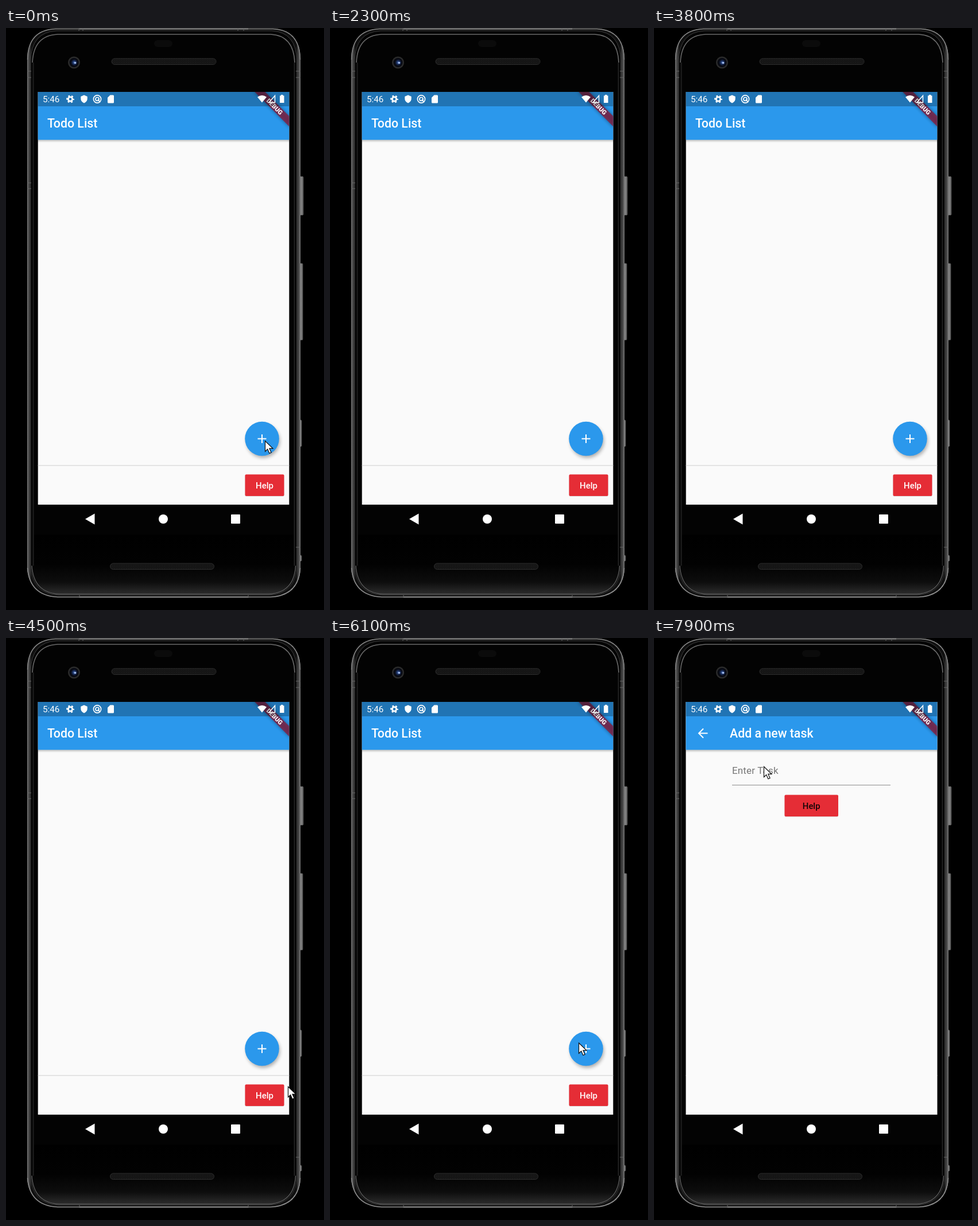
These frames come from a looping animation (554 px wide and 1011 px high, 8000 ms). An HTML page:

```html
<!DOCTYPE html>
<html lang="en">
<head>
<meta charset="utf-8">
<title>Todo List</title>
<style>
  html, body { margin: 0; width: 100%; height: 100%; overflow: hidden; background: #000; }
  svg { display: block; width: 100%; height: 100%; }
  text { font-family: Roboto, sans-serif; }
  .title { font-size: 21.3px; font-weight: 500; fill: #fff; }
  .label { font-size: 14.9px; font-weight: 500; text-anchor: middle; }
</style>
</head>
<body>
<svg viewBox="0 0 554 1011">
  <defs>
    <linearGradient id="side">
      <stop offset="0" stop-color="#8c8c8c"/>
      <stop offset=".004" stop-color="#4c4c4c"/>
      <stop offset=".01" stop-color="#3a3a3a"/>
      <stop offset=".015" stop-color="#101010"/>
      <stop offset=".985" stop-color="#101010"/>
      <stop offset=".99" stop-color="#3a3a3a"/>
      <stop offset=".996" stop-color="#505050"/>
      <stop offset="1" stop-color="#8c8c8c"/>
    </linearGradient>
    <linearGradient id="key">
      <stop offset="0" stop-color="#333"/>
      <stop offset=".5" stop-color="#8a8a8a"/>
      <stop offset="1" stop-color="#555"/>
    </linearGradient>
    <linearGradient id="chin" x2="0" y2="1">
      <stop offset="0" stop-color="#000"/>
      <stop offset=".5" stop-color="#020202"/>
      <stop offset=".8" stop-color="#0d0d0d"/>
      <stop offset="1" stop-color="#2c2c2c"/>
    </linearGradient>
    <linearGradient id="fade" x2="0" y2="1">
      <stop offset="0" stop-opacity=".24"/>
      <stop offset="1" stop-opacity="0"/>
    </linearGradient>
    <radialGradient id="lens">
      <stop offset="0" stop-color="#5d7fc4"/>
      <stop offset=".45" stop-color="#1b3163"/>
      <stop offset="1" stop-color="#07080f"/>
    </radialGradient>
    <pattern id="mesh" width="3" height="3" patternUnits="userSpaceOnUse">
      <rect width="3" height="3" fill="#0b0b0b"/>
      <path d="M0 0l3 3M3 0L0 3" stroke="#262626" stroke-width=".7"/>
    </pattern>
    <filter id="blur" x="-50%" y="-50%" width="200%" height="200%"><feGaussianBlur stdDeviation="3"/></filter>
    <clipPath id="screen"><path d="M55.700 111h437.600v717h-437.600z"/></clipPath>
    <g id="bar">
      <path d="M55 194h439v5h-439z" fill="url(#fade)"/>
      <path d="M55 111h439v83.300h-439z" fill="#2b98ec"/>
    </g>
  </defs>

  <rect width="554" height="1011"/>
  <g id="keys"></g>
  <path d="M86 1H465Q513 3 513 55V938Q511 987 461 989H90Q40 987 37 938V55Q38 3 86 1Z" fill="url(#side)"/>
  <path d="M88 5H463Q506 7 506.500 57V934Q505 983 458 985H92Q45 983 43 934V57Q44 7 88 5Z" fill="#030303" stroke="#3c3c3c"/>
  <path d="M47 880H503V934Q502 981 458 983H92Q48 981 47 934Z" fill="url(#chin)"/>
  <g fill="none">
    <path d="M37.500 55Q38 3.500 86 1.500H465Q512 3.500 512.500 55" stroke="#888" stroke-width="1.500"/>
    <path d="M46 60Q48 13 90 11H461Q501 13 503 60" stroke="#686868" stroke-width="1.600"/>
    <path d="M47.500 60V934M502.500 60V934" stroke="#202020" stroke-width="2"/>
    <path d="M37.500 938Q41 986 90 988.500H461Q510 986 512.500 938" stroke="#909090" stroke-width="1.600"/>
    <path d="M45 934Q48 981 92 983.500H458Q502 981 504.500 934" stroke="#5c5c5c" stroke-width="1.400"/>
  </g>
  <path d="M128 1.500H422M128 988.500H422" stroke="#888" stroke-width="2"/>
  <path d="M127 0v5m7-5v5M404 0v5m10-5v5M128 985v5M422 985v5M37 75h7m-7 11h7M37 269h7m-7 10h7M505 75h8m-8 11h8M505 902h8" stroke="#666"/>

  <rect x="258" y="21" width="32" height="12" rx="6" fill="#0b0b0b"/>
  <circle cx="118.500" cy="60" r="10.500" fill="#2b2b2b"/>
  <circle cx="118.500" cy="60" r="8" fill="#080a12"/>
  <circle cx="119" cy="60" r="6" fill="url(#lens)"/>
  <circle cx="120.500" cy="60.500" r="1.800" fill="#a9c2f0"/>
  <g fill="url(#mesh)" stroke="#2c2c2c">
    <rect x="184" y="53" width="182" height="10.500" rx="5.250"/>
    <rect x="181.500" y="930" width="181" height="10.500" rx="5.250"/>
  </g>
  <g fill="#fff">
    <path d="M138 853L154.500 843.500V862.500Z"/>
    <circle cx="274" cy="853" r="8"/>
    <rect x="392" y="845" width="16" height="16" rx="1"/>
  </g>

  <g clip-path="url(#screen)">
    <g id="list">
      <path d="M55 111h439v717h-439z" fill="#fafafa"/>
      <use href="#bar"/>
      <text class="title" x="72" y="173.300">Todo List</text>
      <path d="M55 760h439" stroke="#dcdcdc" stroke-width="1.500"/>
      <rect x="416.500" y="776" width="68" height="37.700" rx="2" opacity=".15"/>
      <rect x="416.500" y="775.500" width="68" height="37.500" rx="2" fill="#e52d36"/>
      <text class="label" x="450.500" y="799.500" fill="#fff">Help</text>
      <circle cx="448" cy="717.500" r="29" opacity=".32" filter="url(#blur)"/>
      <circle cx="446" cy="713.500" r="29.800" fill="#2b98ec"/>
      <path d="M438.500 713.500h15m-7.500-7.500v15" stroke="#fff" stroke-width="2"/>
    </g>
    <g id="form">
      <path d="M55 111h439v717h-439z" fill="#fafafa"/>
      <use href="#bar"/>
      <path d="M93.500 165.500H78m8-8l-8 8 8 8" fill="none" stroke="#fff" stroke-width="2"/>
      <text class="title" x="132" y="173.300">Add a new task</text>
      <text x="136" y="236" font-size="17" letter-spacing=".16" fill="#777">Enter Task</text>
      <path d="M136 255.500h276" stroke="#8c8c8c"/>
      <rect x="227.500" y="273" width="93.500" height="37.700" rx="2" opacity=".15"/>
      <rect x="227.500" y="272.500" width="93.500" height="37.500" rx="2" fill="#e52d36"/>
      <text class="label" x="274.200" y="296.500" fill="#140507">Help</text>
    </g>

    <g transform="translate(493.500 111) rotate(45)">
      <path d="M-43 29.800h86v12.800h-86z" opacity=".4" filter="url(#blur)"/>
      <path d="M-43 29.800h86v12.800h-86z" fill="#8c1838" opacity=".74"/>
      <text y="40" font-size="10.850" font-weight="900" text-anchor="middle" fill="#fff">DEBUG</text>
    </g>

    <path d="M55 111h439v25h-439z" opacity=".24"/>
    <g fill="#fff">
      <text x="64" y="129.300" font-size="15.200">5:46</text>
      <g fill="none" stroke="#fff">
        <circle cx="112" cy="123.500" r="3.700" stroke-width="2.800"/>
        <circle cx="112" cy="123.500" r="5.700" stroke-width="2.400" stroke-dasharray="2.900 3.070" stroke-dashoffset="1.450"/>
      </g>
      <path d="M136 116.500l5.700 2.500v4q0 5-5.700 7.500-5.700-2.500-5.700-7.500v-4z"/>
      <g fill="none" stroke="#fff" stroke-width="1.700">
        <circle cx="159" cy="123.500" r="6.600"/>
        <circle cx="159" cy="123.500" r="3"/>
        <path d="M160 124l4 5"/>
      </g>
      <path d="M181.500 116.500h5q1.500 0 1.500 1.500v11q0 1.500-1.500 1.500h-8q-1.500 0-1.500-1.500v-8z"/>
      <path d="M438 120q8-6 16 0l-8 9.500z"/>
      <path d="M468.500 117.500v12H458z" fill="none" stroke="#fff" stroke-width="1.500"/>
      <path d="M479 117.500v-1.500h3.500v1.500h2v12.500h-7.500v-12.500z"/>
    </g>
  </g>
  <path id="mouse" d="M.5.500V18.500l4.200-4 3.200 7.300 3.200-1.400-3.200-7h6z" fill="#fff" stroke="#111" stroke-width="1.200"/>
</svg>
<script>
  const $ = id => document.getElementById(id);
  const LOOP = 8000, STEP = 100;

  // Side buttons: x, y, width, height
  $('keys').innerHTML = [[511, 258, 7, 67], [511, 409, 6, 133], [511, 681, 4, 46], [511, 916, 4, 10]]
    .map(([x, y, w, h]) =>
      `<rect x="${x}" y="${y}" width="${w}" height="${h}" rx="1.5" fill="url(#key)" stroke="#666" stroke-width=".6"/>`)
    .join('');

  // Pointer strokes: start, end, from, to
  const strokes = [
    [0, 600, [451, 717], [451, 717]],
    [4300, 4500, [494, 827], [491, 779]],
    [4500, 5100, [491, 779], [433, 703]],
    [5100, 6700, [433, 703], [433, 703]],
    [6700, 7300, [433, 703], [204, 270]],
    [7300, 7800, [204, 270], [191, 223]],
    [7800, LOOP, [191, 223], [191, 223]]
  ];

  const clamp = x => Math.min(1, Math.max(0, x));
  const easeOut = x => 1 - (1 - x) ** 3;
  const smooth = x => x * x * (3 - 2 * x);

  function draw(t) {
    const open = clamp((t - 6300) / 300);
    $('form').setAttribute('opacity', open * open);
    $('form').setAttribute('transform', `translate(0 ${179 * (1 - easeOut(open))})`);

    const s = strokes.find(([a, b]) => t >= a && t < b);
    $('mouse').setAttribute('visibility', s ? 'visible' : 'hidden');
    if (!s) return;
    const [a, b, p, q] = s, k = smooth((t - a) / (b - a));
    const [x, y] = p.map((v, i) => v + (q[i] - v) * k);
    $('mouse').setAttribute('transform', `translate(${x} ${y})`);
  }

  function tick() {
    const t = performance.now() % LOOP;
    draw(Math.floor(t / STEP) * STEP);
    requestAnimationFrame(tick);
  }
  tick();
</script>
</body>
</html>
```
